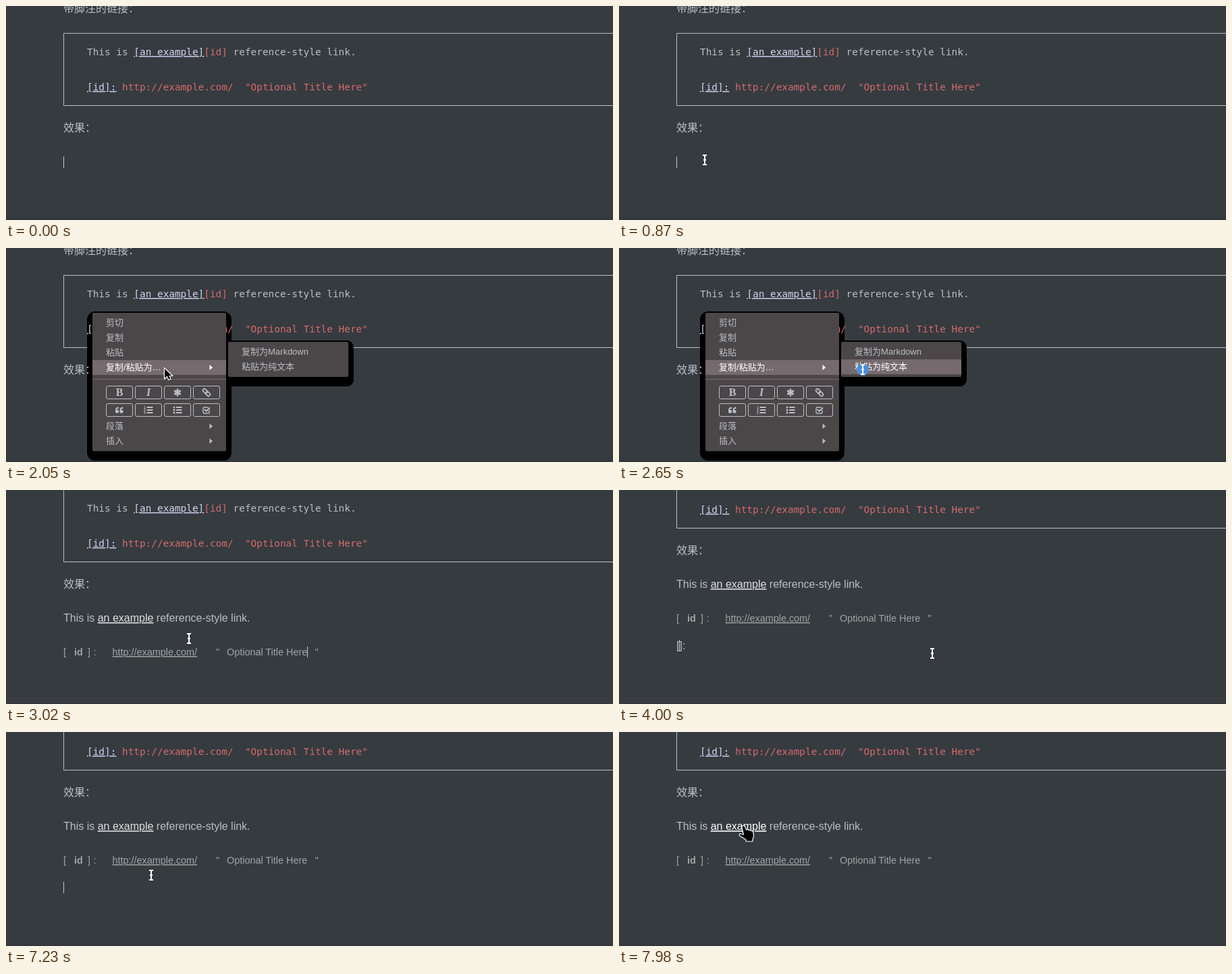
These frames come from a looping animation (899x317 px, 8000 ms). An HTML page:

```html
<!DOCTYPE html>
<html lang="zh-CN">
<head>
<meta charset="utf-8">
<style>
  html, body { margin: 0; width: 100%; height: 100%; overflow: hidden; background: #363b40; }
  svg { display: block; }
  text { white-space: pre; font: 16px "Liberation Sans", "Noto Sans CJK SC", "Noto Sans CJK", sans-serif; fill: #b8bfc6; }
  .code text { font: 14.4px "DejaVu Sans Mono", monospace; }
  .string { fill: #d26b6b; }
  .ref { fill: #d3d3ef; text-decoration: underline; }
  .def text { font-size: 14.4px; fill: #a0a6a3; }
  #link { fill: #e0e0e0; text-decoration: underline; }
  #link.hover { fill: #fff; }
  .menu text { font-size: 13px; }
  .menu .panel { fill: #4b4648; }
  .menu .row { fill: #756b6e; }
  .menu .active text { fill: #fff; }
  .menu .active path { fill: #fff; }
  .button { fill: none; stroke: #b8bfc6; }
  .icon { fill: none; stroke: #b8bfc6; stroke-width: 2; }
  .solid { fill: #b8bfc6; }
  .menu .serif { font: bold 16px "Liberation Serif", serif; text-anchor: middle; }
  .menu .digit { font-size: 5px; font-weight: bold; }
  .pointer { fill: #000; stroke: #fff; stroke-width: 1.2; stroke-linejoin: round; }
</style>
</head>
<body>
<svg width="899" height="317" viewBox="0 0 899 317">
  <g class="scroll">
    <path d="M910 40.5H85.5V147.5H910" fill="none" stroke="#b8bfc6"/>
  </g>

  <rect class="submenu" x="321" y="137" width="194" height="68" rx="10"/>
  <rect class="mainmenu" x="120" y="94" width="214" height="221" rx="12"/>

  <g class="scroll">
    <text x="85" y="9">带脚注的链接：</text>
    <g class="code">
      <text x="120" y="73">This is <tspan class="ref">[an example]</tspan><tspan class="string">[id]</tspan> reference-style link.</text>
      <text x="120" y="125"><tspan class="ref">[id]:</tspan> <tspan class="string">http://example.com/  "Optional Title Here"</tspan></text>
    </g>
    <text x="85" y="186">效果：</text>
    <g id="pasted">
      <text x="85" y="236">This is <tspan id="link">an example</tspan> reference-style link.</text>
      <g class="def">
        <text x="85" y="286">[</text>
        <text x="101" y="286" font-weight="bold" style="font-weight:bold">id</text>
        <text x="121" y="286">]</text>
        <text x="129.5" y="286">:</text>
        <text x="157.5" y="286" text-decoration="underline">http://example.com/</text>
        <text x="311" y="286">"</text>
        <text x="327" y="286">Optional Title Here</text>
        <text x="457.5" y="286">"</text>
      </g>
    </g>
    <text id="typed" x="85" y="327"></text>
  </g>
  <rect id="caret" width="1" fill="#c4cad0"/>
  <rect y="315" width="899" height="2" fill="#32363a"/>

  <g class="menu mainmenu">
    <rect class="panel" x="128" y="96" width="198" height="205" rx="2"/>
    <rect class="row" id="parentRow" x="128" y="166" width="198" height="22"/>
    <text x="148" y="115">剪切</text>
    <text x="148" y="137">复制</text>
    <text x="148" y="159">粘贴</text>
    <g id="parentItem">
      <text x="148" y="181">复制/粘贴为…</text>
      <path class="solid" d="M301.5 173l4.5 4-4.5 4z"/>
    </g>
    <path d="M128 194.5H326" stroke="#756b6e"/>
    <text x="148" y="268">段落</text>
    <path class="solid" d="M301.5 260l4.5 4-4.5 4z"/>
    <text x="148" y="290">插入</text>
    <path class="solid" d="M301.5 282l4.5 4-4.5 4z"/>
    <g id="buttons"></g>
    <text class="serif" x="168" y="219">B</text>
    <text class="serif" x="211" y="219" font-style="italic" style="font-style:italic">I</text>
    <path class="icon" style="stroke-width:2.8" d="M254 208.5v11M249.2 211.2l9.6 5.6M249.2 216.8l9.6-5.6"/>
    <g class="icon" style="stroke-width:1.7" transform="translate(297 214) rotate(45)">
      <rect x="-6.5" y="-2.3" width="7" height="4.6" rx="2"/>
      <rect x="-.5" y="-2.3" width="7" height="4.6" rx="2"/>
    </g>
    <g class="solid">
      <path id="quote" d="M167 236c-3.600-1-5 1.500-5 4.500v2.500q0 1.500 1.500 1.500h2q1.500 0 1.500-1.500v-1.700q0-1.300-1.300-1.300h-1.700q0-2 3-2.200z"/>
      <use href="#quote" x="6.500"/>
      <circle cx="249" cy="236" r="1.500"/>
      <circle cx="249" cy="240" r="1.500"/>
      <circle cx="249" cy="244" r="1.500"/>
    </g>
    <path class="icon" d="M208.500 236h9M208.500 240h9M208.500 244h9M252 236h8.500M252 240h8.500M252 244h8.500"/>
    <text class="digit" x="204" y="238">1</text>
    <text class="digit" x="204" y="242">2</text>
    <text class="digit" x="204" y="246">3</text>
    <path class="icon" style="stroke-width:1.400" d="M301 240v3.500q0 1.500-1.500 1.500h-6q-1.500 0-1.500-1.500v-6q0-1.500 1.500-1.500h6"/>
    <path class="icon" d="M294 239l2.700 2.800 5.300-5.300"/>
  </g>

  <g class="menu submenu">
    <rect class="panel" x="329" y="139" width="178" height="52" rx="2"/>
    <rect class="row" id="plainRow" x="329" y="165" width="178" height="22"/>
    <text x="349" y="158">复制为Markdown</text>
    <g id="plainItem"><text x="349" y="180">粘贴为纯文本</text></g>
  </g>

  <g id="mouse">
    <circle id="busy" r="9" fill="#4a90d9"/>
    <path id="beam" fill="#fff" d="M-3-8h6v2h-2v5h1v2h-1v5h2v2h-6v-2h2v-5h-1v-2h1v-5h-2z"/>
    <path id="arrow" class="pointer" d="M.5.5V17L4.500 13.500 7 18.500 10 17 8 12.500H13z"/>
    <path id="hand" class="pointer" d="M-3-3c1.500-1.200 3 0 3.500 1.200L2.500 3c1.500-1 3-.6 3.700.6 1.300-.8 2.800-.3 3.400.9 1.600-.5 2.900.5 3.200 2.200l.7 5.300c.1 2-1 3-1.500 4.500V20H2v-2.500L-7 12c-2-1.700-.5-4 1.800-3L-1.500 10-4-.5c-.3-1 0-2 1-2.500z"/>
  </g>
</svg>
<script>
const LOOP = 8000, MENU_OPEN = 1240, PASTE = 2700, ENTER = 4000;
const byId = id => document.getElementById(id);
const all = selector => document.querySelectorAll(selector);
const show = (element, on) => { element.style.display = on ? '' : 'none'; };
const latest = (steps, t) => steps.findLast(step => step[0] <= t);

// time, x, y
const mousePath = [
  [570, 136, 235], [870, 127, 228], [1240, 127, 228], [1400, 145, 218], [1610, 183, 193],
  [1720, 203, 180], [2010, 232, 177], [2050, 234, 177], [2300, 310, 177], [2560, 361, 180],
  [2690, 361, 180], [2850, 223, 214], [2940, 223, 214], [3180, 365, 233], [3340, 464, 242],
  [4000, 464, 242], [4150, 412, 254], [4290, 360, 251], [4480, 360, 251], [4920, 327, 251],
  [5780, 327, 251], [5980, 280, 255], [6170, 232, 251], [7070, 232, 251], [7230, 215, 212],
  [7510, 214, 157], [7740, 214, 157], [7980, 186, 142], [8000, 186, 142]
];
// time, x (0 = blinked off), top, height
const caretSteps = [
  [0, 85, 223, 17], [270, 0], [770, 85, 223, 17], [1620, 0], [2120, 85, 223, 17], [2620, 0],
  [PASTE, 446, 232, 16], [3200, 0], [3700, 446, 232, 16], [ENTER, 89, 222, 17], [4500, 0],
  [4920, 89, 222, 17], [5420, 0], [5780, 94, 222, 17], [6080, 98, 222, 17], [6570, 0],
  [6660, 94, 222, 17], [6820, 89, 222, 17], [7230, 85, 222, 17], [7740, 0]
];
const typedSteps = [[0, ''], [ENTER, '[]:'], [6660, '[]'], [6820, '['], [7230, '']];
const scrollSteps = [[0, 0], [PASTE, 41], [ENTER, 91]];

for (let i = 0; i < 8; i++) {
  const x = 148.5 + i % 4 * 43, y = i < 4 ? 204.5 : 230.5;
  byId('buttons').innerHTML += `<rect class="button" x="${x}" y="${y}" width="39" height="19" rx="2.5"/>`;
}

function mouseAt(t) {
  const next = mousePath.findIndex(point => point[0] > t);
  if (next < 1) return mousePath[0].slice(1);
  const [t0, x0, y0] = mousePath[next - 1], [t1, x1, y1] = mousePath[next];
  const k = (t - t0) / (t1 - t0);
  return [Math.round(x0 + (x1 - x0) * k), Math.round(y0 + (y1 - y0) * k)];
}

function highlight(name, on) {
  show(byId(name + 'Row'), on);
  byId(name + 'Item').classList.toggle('active', on);
}

function draw(t) {
  const menuOpen = t >= MENU_OPEN && t < PASTE;
  const [x, y] = mouseAt(t);
  all('.scroll').forEach(g => g.setAttribute('transform', `translate(0 ${-latest(scrollSteps, t)[1]})`));
  all('.mainmenu').forEach(e => show(e, menuOpen));
  all('.submenu').forEach(e => show(e, menuOpen && t >= 1880));
  highlight('parent', y <= 188);
  highlight('plain', x >= 329);

  show(byId('pasted'), t >= PASTE);
  byId('typed').textContent = latest(typedSteps, t)[1];
  const [, caretX, top, height] = latest(caretSteps, t);
  show(byId('caret'), caretX);
  if (caretX) {
    byId('caret').setAttribute('x', caretX);
    byId('caret').setAttribute('y', top);
    byId('caret').setAttribute('height', height);
  }

  const busy = t >= 2620 && t < PASTE;
  const arrow = menuOpen && !busy;
  const onLink = t > 7740 && y < 151;
  show(byId('mouse'), t >= 570);
  byId('mouse').setAttribute('transform', `translate(${x} ${y})`);
  show(byId('busy'), busy);
  show(byId('arrow'), arrow);
  show(byId('hand'), onLink);
  show(byId('beam'), !arrow && !onLink);
  byId('link').classList.toggle('hover', onLink);
}

const start = performance.now();
function tick() {
  draw((performance.now() - start) % LOOP);
  requestAnimationFrame(tick);
}
tick();
</script>
</body>
</html>
```
